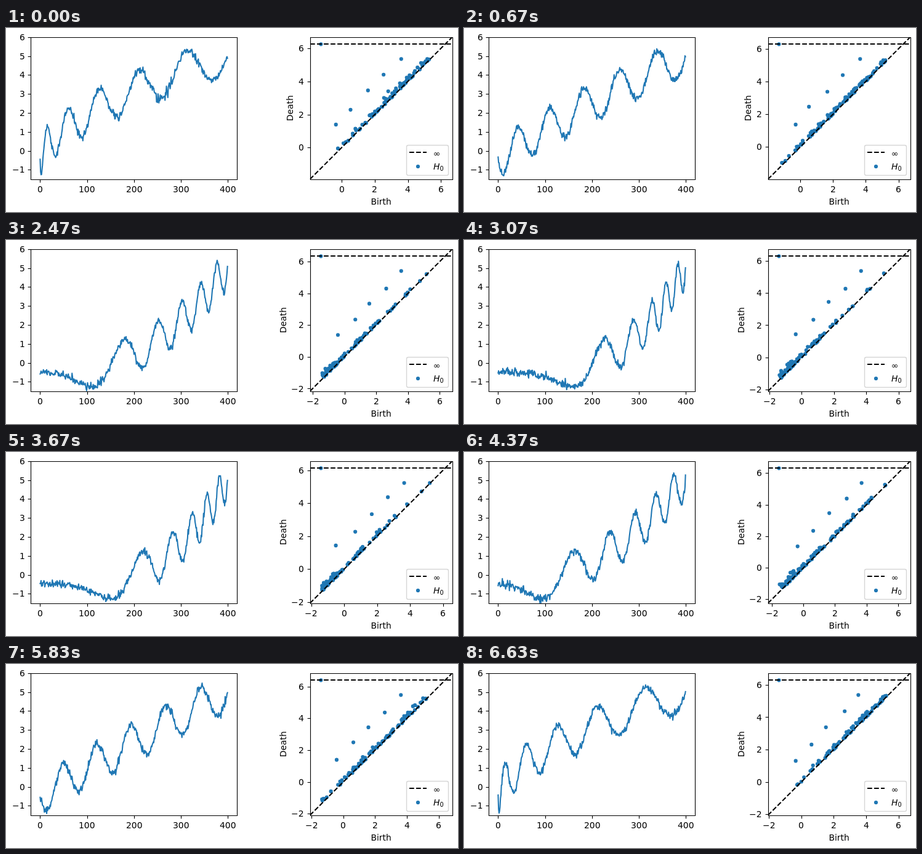
These frames come from a looping animation (734 by 299 pixels, 6.66 s). An HTML page:

```html
<!DOCTYPE html>
<html lang="en">
<head>
<meta charset="utf-8">
<title>Warped series and its persistence diagram</title>
<style>
  html, body { margin: 0; width: 100%; height: 100%; overflow: hidden; background: #fff; }
  svg { display: block; width: 734px; height: 299px; }
  text { font: 13.89px "DejaVu Sans", sans-serif; fill: #000; }
  .axis { fill: none; stroke: #000; stroke-width: 1.11; }
  .dash { fill: none; stroke: #000; stroke-width: 2.083; stroke-dasharray: 7.71 3.33; }
  .curve { fill: none; stroke: #1f77b4; stroke-width: 2.083; stroke-linejoin: round; stroke-linecap: square; }
  .dots { fill: none; stroke: #1f77b4; stroke-width: 6.2; stroke-linecap: round; }
  .mid { text-anchor: middle; }
</style>
</head>
<body>
<svg id="stage" viewBox="0 0 734 299" xmlns="http://www.w3.org/2000/svg"></svg>
<script>
const LOOP = 6660, FRAMES = 200, POINTS = 400, NOISE = 0.1;
const P_MIN = 0.6, P_MAX = 4, CYCLES = 5.5;
const LEFT = { x0: 40.2, x1: 374.86 }, RIGHT = { x0: 493.62, x1: 724.62 };
const TOP = 14.8, BOTTOM = 245.8, SIDE = BOTTOM - TOP;
const stage = document.getElementById('stage');

function add(tag, attrs, parent = stage, content) {
  const node = document.createElementNS('http://www.w3.org/2000/svg', tag);
  for (const key in attrs) node.setAttribute(key, attrs[key]);
  if (content !== undefined) node.textContent = content;
  parent.appendChild(node);
  return node;
}

// Thin lines sit on pixel centres, text on whole pixels
const snap = v => Math.floor(v + 0.5) + 0.5;

function clip(id, { x0, x1 }) {
  add('rect', { x: x0, y: TOP, width: x1 - x0, height: SIDE }, add('clipPath', { id }));
  return add('g', { 'clip-path': `url(#${id})` });
}

function makeTick(value) {
  const group = add('g', {});
  const mark = add('path', { class: 'axis' }, group);
  const text = add('text', {}, group, String(value).replace('-', '\u2212'));
  return { group, mark, text, width: text.getComputedTextLength() };
}

function placeText(text, x, y) {
  text.setAttribute('x', Math.round(x));
  text.setAttribute('y', Math.round(y));
}

function placeX({ mark, text, width }, x) {
  mark.setAttribute('d', `M${snap(x)} ${snap(BOTTOM)}v4.86`);
  placeText(text, x - width / 2, 267);
}

function placeY({ mark, text, width }, y, { x0 }) {
  mark.setAttribute('d', `M${snap(x0)} ${snap(y)}h-4.86`);
  placeText(text, x0 - 9.72 - width, y + 5.06);
}

function frame({ x0, x1 }) {
  add('path', { class: 'axis',
    d: `M${snap(x0)} ${snap(TOP)}H${snap(x1)}V${snap(BOTTOM)}H${snap(x0)}Z` });
}

// Left plot
const pad = (LEFT.x1 - LEFT.x0) / 22;
const seriesX = i => LEFT.x0 + pad + i / (POINTS - 1) * (LEFT.x1 - LEFT.x0 - 2 * pad);
const seriesY = v => TOP + (6 - v) * SIDE / 7.5;
const curve = add('path', { class: 'curve' }, clip('leftClip', LEFT));
for (let v = 0; v <= 400; v += 100) placeX(makeTick(v), seriesX(v));
for (let v = -1; v <= 6; v++) placeY(makeTick(v), seriesY(v), LEFT);
frame(LEFT);

// Right plot
const diagram = clip('rightClip', RIGHT);
const infinityY = TOP + 0.05 * SIDE;
const dots = add('path', { class: 'dots' }, diagram);
add('path', { class: 'dash', d: `M${RIGHT.x0} ${BOTTOM}L${RIGHT.x1} ${TOP}` }, diagram);
add('path', { class: 'dash', d: `M${Math.round(RIGHT.x0)} ${Math.round(infinityY)}H${RIGHT.x1}` }, diagram);
const ticks = [-2, 0, 2, 4, 6].map(v => ({ v, x: makeTick(v), y: makeTick(v) }));
frame(RIGHT);
add('text', { class: 'mid', x: (RIGHT.x0 + RIGHT.x1) / 2, y: 287 }, stage, 'Birth');
const deathLabel = add('text', { class: 'mid' }, stage, 'Death');

// Legend
add('rect', { x: 650.5, y: 190.5, width: 68, height: 49, rx: 2.8,
  fill: '#fff', stroke: '#ccc', 'stroke-width': 1.39, opacity: 0.8 });
add('path', { class: 'dash', d: 'M655 202h28' });
add('path', { class: 'dots', d: 'M669 225h0' });
add('text', { x: 694, y: 209 }, stage, '\u221e');
add('text', { x: 694, y: 230, style: 'font-style:oblique' }, stage, 'H');
add('text', { x: 704.5, y: 232, style: 'font-size:9.72px' }, stage, '0');

function randomSource(seed) {
  return () => {
    seed = (seed + 0x6D2B79F5) | 0;
    let t = Math.imul(seed ^ (seed >>> 15), 1 | seed);
    t = (t + Math.imul(t ^ (t >>> 7), 61 | t)) ^ t;
    return ((t ^ (t >>> 14)) >>> 0) / 4294967296;
  };
}

// Rising sine whose time axis is warped by a power, plus Gaussian noise
function makeSeries(index) {
  const half = FRAMES / 2 - 1;
  const step = index <= half ? index : FRAMES - 1 - index;
  const power = P_MIN * (P_MAX / P_MIN) ** (step / half);
  const random = randomSource(index * 7919 + 17);
  return Array.from({ length: POINTS }, (_, i) => {
    const phase = CYCLES * (i / (POINTS - 1)) ** power;
    const gauss = Math.sqrt(-2 * Math.log(1 - random())) * Math.cos(2 * Math.PI * random());
    return phase - 0.5 - Math.sin(2 * Math.PI * phase) + NOISE * gauss;
  });
}

// Sublevel-set components: when two meet, the one born later dies
function persistence(values) {
  const root = new Array(values.length).fill(-1);
  const find = i => root[i] === i ? i : (root[i] = find(root[i]));
  const pairs = [];
  const order = values.map((_, i) => i).sort((a, b) => values[a] - values[b]);
  for (const i of order) {
    root[i] = i;
    for (const j of [i - 1, i + 1]) {
      if (!(root[j] >= 0)) continue;
      let older = find(i), younger = find(j);
      if (values[older] > values[younger]) [older, younger] = [younger, older];
      if (younger !== i) pairs.push([values[younger], values[i]]);
      root[younger] = older;
    }
  }
  return { pairs, lowest: values[order[0]] };
}

function draw(index) {
  const values = makeSeries(index);
  curve.setAttribute('d', 'M' + values.map((v, i) =>
    `${seriesX(i).toFixed(2)} ${seriesY(v).toFixed(2)}`).join('L'));

  const { pairs, lowest } = persistence(values);
  const highest = Math.max(...pairs.map(p => p[1]));
  const range = highest - lowest;
  const low = lowest - range / 10;
  const scale = SIDE / (range * 1.3);
  const px = v => RIGHT.x0 + (v - low) * scale;
  const py = v => BOTTOM - (v - low) * scale;
  const dot = (x, y) => `M${x.toFixed(2)} ${y.toFixed(2)}h0`;
  dots.setAttribute('d', dot(px(lowest), infinityY) +
    pairs.map(([b, d]) => dot(px(b), py(d))).join(''));

  for (const { v, x, y } of ticks) {
    placeX(x, px(v));
    placeY(y, py(v), RIGHT);
    x.group.style.display = y.group.style.display = v < low ? 'none' : '';
  }
  deathLabel.setAttribute('transform',
    `translate(${low <= -2 ? 455 : 466} ${(TOP + BOTTOM) / 2}) rotate(-90)`);
}

const start = performance.now();
let shown = -1;
function tick() {
  const t = (performance.now() - start) % LOOP;
  // Steps of 33.3 ms, rounded to hundredths of a second
  const index = Math.min(FRAMES - 1, Math.floor((t + 5) * 3 / 100));
  if (index !== shown) draw(shown = index);
  requestAnimationFrame(tick);
}
tick();
</script>
</body>
</html>
```
